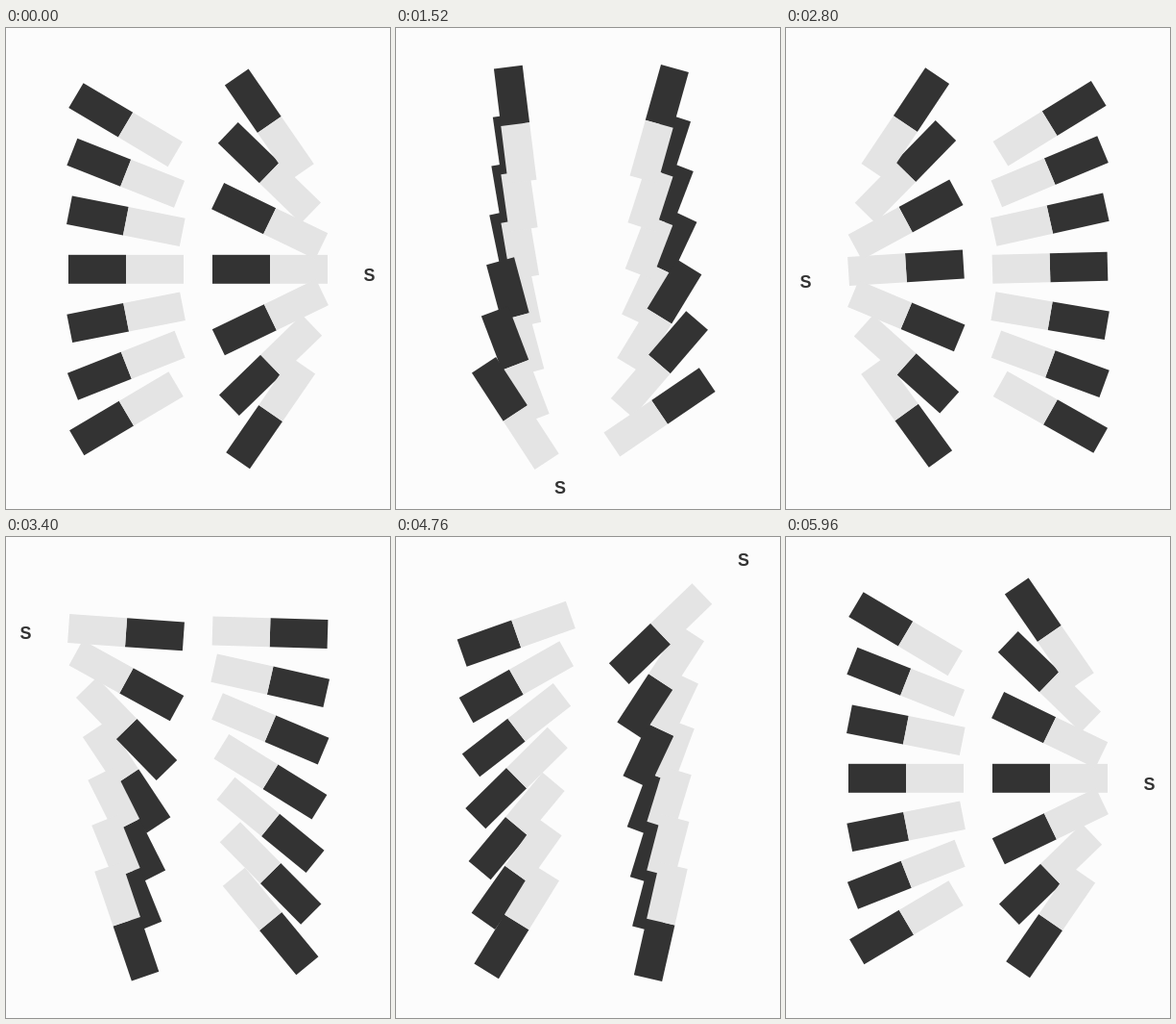
Write an HTML page with a canvas that moves like this. It is 400x500 px and loops after 6000 ms.

```html
<!DOCTYPE html>
<html lang="en">
<head>
<meta charset="utf-8">
<title>Magnets</title>
<style>
  html, body { margin: 0; width: 100%; height: 100%; overflow: hidden; background: #fcfcfc; }
  canvas { display: block; }
</style>
</head>
<body>
<canvas id="stage" width="400" height="500"></canvas>
<script>
const ctx = document.getElementById('stage').getContext('2d');
const DARK = '#333', LIGHT = '#e4e4e4', PAPER = '#fcfcfc';
const STEP = 40, STEPS = 150;

// The pole travels clockwise round this rectangle.
const box = { left: 20.5, right: 378.5, top: 16.5, bottom: 470.5 };
const startY = 250;
const width = box.right - box.left, height = box.bottom - box.top;
const lap = 2 * (width + height);

// [step, distance travelled from the middle of the right side]
const keys = [
  [0, 0], [12, 77], [32, 240.5], [38, 428], [48, 576], [70, 792.5],
  [96, 1028.5], [97, 1029.5], [119, 1374], [128, 1392.5], [149, lap]
];

// Monotone cubic interpolation that joins up at the loop point.
const last = keys.length - 1;
const rates = keys.slice(1).map(([t, d], i) => (d - keys[i][1]) / (t - keys[i][0]));
const slopes = keys.map((_, i) => {
  const before = rates[(i + last - 1) % last], after = rates[i % last];
  return 2 * before * after / (before + after);
});

function distanceAt(step) {
  let i = 0;
  while (i < last - 1 && step > keys[i + 1][0]) i++;
  const [t0, d0] = keys[i], [t1, d1] = keys[i + 1];
  const span = t1 - t0, u = (step - t0) / span, v = 1 - u;
  return d0 * v * v * (1 + 2 * u) + d1 * u * u * (3 - 2 * u)
    + span * u * v * (slopes[i] * v - slopes[i + 1] * u);
}

function poleAt(step) {
  let d = (distanceAt(step) + startY - box.top) % lap;
  if (d < height) return [box.right, box.top + d];
  d -= height;
  if (d < width) return [box.right - d, box.bottom];
  d -= width;
  if (d < height) return [box.left, box.bottom - d];
  return [box.left + d - height, box.top];
}

// The pivot sits slightly off the magnet's long axis.
function drawMagnet(x, y, [px, py]) {
  ctx.save();
  ctx.translate(x, y);
  ctx.rotate(Math.atan2(py - y, px - x));
  ctx.translate(0, 0.8);
  ctx.fillStyle = DARK;
  ctx.fillRect(-60, -15, 60, 30);
  ctx.fillStyle = LIGHT;
  ctx.fillRect(0, -15, 60, 30);
  ctx.restore();
}

function draw(now) {
  const pole = poleAt(Math.floor(now / STEP) % STEPS);
  ctx.fillStyle = PAPER;
  ctx.fillRect(0, 0, 400, 500);

  // Outer rows lie on top of inner ones.
  for (const offset of [0, -50, 50, -100, 100, -150, 150]) {
    for (const x of [125, 275]) drawMagnet(x, 250 + offset, pole);
  }

  ctx.fillStyle = DARK;
  ctx.font = 'bold 18px "Liberation Sans", Arial, sans-serif';
  ctx.textAlign = 'center';
  ctx.fillText('S', pole[0], pole[1] + 13);
}

const start = performance.now();
function tick() {
  draw(performance.now() - start);
  requestAnimationFrame(tick);
}
tick();
</script>
</body>
</html>
```
